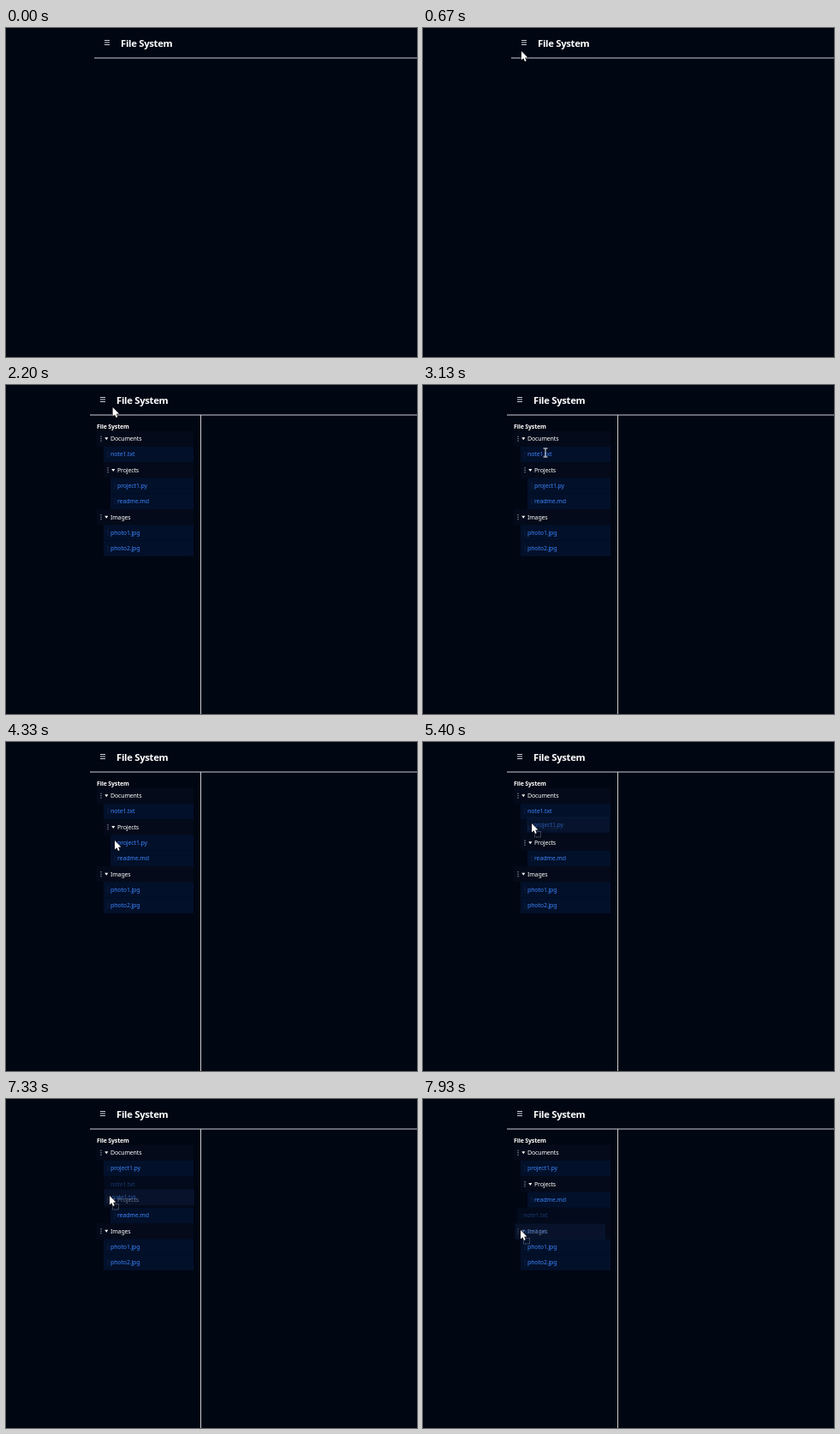
Animation, 480 px wide and 384 px high, one loop 8 s. Source, as an HTML page with a canvas:

```html
<!DOCTYPE html>
<html lang="en">
<head>
<meta charset="utf-8">
<title>File System</title>
<style>
html, body { margin: 0; width: 100%; height: 100%; overflow: hidden; background: #010613; }
canvas { display: block; width: 480px; height: 384px; }
</style>
</head>
<body>
<canvas id="stage"></canvas>
<script>
const LOOP = 8000;
const OPEN_AT = 1870;
const COLORS = {
  page: '#010613', line: '#c9ccd3', text: '#ffffff',
  folder: '#040a19', file: '#03102a', link: '#3b82f6', ghost: '#0b1a38'
};
const canvas = document.getElementById('stage');
const scale = window.devicePixelRatio || 1;
canvas.width = 480 * scale;
canvas.height = 384 * scale;
const ctx = canvas.getContext('2d');

const folder = (name, level) => ({ name, level, isFolder: true });
const file = (name, level, placeholder = false) => ({ name, level, placeholder });
const images = [folder('Images', 0), file('photo1.jpg', 1), file('photo2.jpg', 1)];
const tree = (...rows) => [folder('Documents', 0), ...rows, ...images];

const projects = folder('Projects', 1);
const readme = file('readme.md', 2);
const py = (level, held) => file('project1.py', level, held);
const note = (level, held) => file('note1.txt', level, held);

// Each tree holds from its start time until the next one.
const trees = [
  [0, tree(note(1), projects, py(2), readme)],
  [5270, tree(note(1), projects, py(2, true), readme)],
  [5400, tree(note(1), py(1, true), projects, readme)],
  [5600, tree(py(1, true), note(1), projects, readme)],
  [5800, tree(py(1), note(1), projects, readme)],
  [7330, tree(py(1), note(1, true), projects, readme)],
  [7600, tree(py(1), projects, note(2, true), readme)],
  [7800, tree(py(1), projects, readme, note(0.38, true))]
];

const drags = [
  { from: 5270, to: 5800, name: 'project1.py', width: 97 },
  { from: 7330, to: LOOP, name: 'note1.txt', width: 105 }
];

// Pointer path: time, x, y, shape from that time on.
const path = [
  [70, 9, 90, 'arrow'], [600, 105, 32, 'arrow'], [800, 133, 18, 'arrow'], [1130, 133, 18, 'arrow'],
  [1200, 122, 16, 'hand'], [2100, 122, 16, 'arrow'], [2600, 135, 66, 'arrow'],
  [2730, 135, 66, 'arrow'], [2860, 142, 82, 'beam'], [2930, 142, 79, 'beam'],
  [3130, 143, 79, 'beam'], [3470, 143, 79, 'beam'], [3700, 138, 92, 'arrow'],
  [4130, 132, 122, 'arrow'], [4270, 132, 122, 'arrow'], [4330, 127, 115, 'arrow'],
  [4730, 128, 115, 'move'], [5270, 127, 112, 'arrow'], [5400, 127, 95, 'arrow'],
  [5600, 126, 89, 'arrow'], [5800, 127, 88, 'arrow'], [6130, 127, 88, 'arrow'],
  [6200, 143, 92, 'beam'], [6530, 143, 92, 'beam'], [6600, 119, 96, 'move'],
  [7270, 119, 96, 'move'], [7330, 121, 113, 'arrow'], [7930, 114, 153, 'arrow'], [LOOP, 114, 155, 'arrow']
];

function pointerAt(t) {
  const next = path.findIndex(key => key[0] > t);
  if (next < 1) return null;
  const [t0, x0, y0, shape] = path[next - 1];
  const [t1, x1, y1] = path[next];
  const p = (t - t0) / (t1 - t0);
  return { x: x0 + (x1 - x0) * p, y: y0 + (y1 - y0) * p, shape };
}

function rect(color, x, y, w, h) {
  ctx.fillStyle = color;
  ctx.fillRect(x, y, w, h);
}

function label(text, x, y, color, size = 7, weight = 400) {
  ctx.font = `${weight} ${size}px "Noto Sans", "Open Sans", sans-serif`;
  ctx.letterSpacing = size > 10 ? '-0.3px' : '-0.15px';
  ctx.fillStyle = color;
  ctx.fillText(text, x, y);
}

function polygon(points, fill, stroke) {
  ctx.beginPath();
  for (const [x, y] of points) ctx.lineTo(x, y);
  ctx.closePath();
  if (stroke) {
    ctx.strokeStyle = stroke;
    ctx.lineWidth = 1;
    ctx.stroke();
  }
  ctx.fillStyle = fill;
  ctx.fill();
}

function grip(x, y, color) {
  for (const dy of [-3, -0.5, 2]) rect(color, x - 0.5, y + dy, 1, 1);
}

function drawHeader(shift) {
  const x = 103 - shift;
  rect(COLORS.line, x, 34.5, 480 - x, 1);
  for (const y of [14, 16.5, 19]) rect('#e4e6ea', x + 12, y, 6, 0.9);
  label('File System', x + 31, 22.2, COLORS.text, 11.3, 700);
}

function drawRow(row, index) {
  const y = 62.7 + index * 18.3;
  const left = 106 + row.level * 8;
  ctx.globalAlpha = row.placeholder ? 0.4 : 1;
  rect(row.isFolder ? COLORS.folder : COLORS.file, left, y - 9.2, 219 - left, 18.3);
  if (row.isFolder) {
    grip(left + 5, y, '#d5d8de');
    polygon([[left + 9.3, y - 1.4], [left + 13.3, y - 1.4], [left + 11.3, y + 1.6]], COLORS.text);
    label(row.name, left + 16, y + 2.3, COLORS.text, 7, 500);
  } else {
    grip(left + 5, y, '#16356c');
    label(row.name, left + 8, y + 2.3, COLORS.link);
  }
  ctx.globalAlpha = 1;
}

function drawSidebar(t) {
  const p = Math.min(1, (t - OPEN_AT + 30) / 360);
  const width = 130 * (1 - (1 - p) ** 3);
  ctx.save();
  ctx.beginPath();
  ctx.rect(98, 36, width, 348);
  ctx.clip();
  label('File System', 106, 50.6, COLORS.text, 7, 600);
  trees.filter(([start]) => start <= t).pop()[1].forEach(drawRow);
  ctx.restore();
  rect(COLORS.line, 97 + width, 35, 1, 349);
}

function drawGhost({ name, width }, { x, y }) {
  ctx.globalAlpha = 0.6;
  rect(COLORS.ghost, x - 6, y - 7.5, width, 18.3);
  label(name, x + 2, y + 4, COLORS.link);
  ctx.globalAlpha = 1;
  ctx.strokeStyle = '#8d96a5';
  ctx.lineWidth = 0.8;
  ctx.setLineDash([1, 1]);
  ctx.strokeRect(x + 3.5, y + 9.5, 7, 6.5);
  ctx.setLineDash([]);
}

const shapes = {
  arrow() {
    polygon([[0, 0], [0, 10.5], [2.4, 8.3], [4, 12], [5.7, 11.2], [4.2, 7.7], [7.4, 7.5]], '#fff', '#000');
  },
  hand() {
    polygon([[-1, 0], [0.8, 0], [1, 4], [3, 4], [5, 4.8], [7, 6], [7, 9], [5.7, 12],
      [0, 12], [-3.4, 7.6], [-2.8, 6.6], [-1, 8]], '#fff', '#000');
    for (const x of [1.2, 3.2, 5.1]) rect('#555', x, 5, 0.5, 2.3);
  },
  beam() {
    rect('#e6e8ec', -0.5, -5, 1, 10);
    for (const y of [-5.5, 4.5]) rect('#e6e8ec', -2.5, y, 5, 1);
  },
  move() {
    rect('#fff', -6, -0.5, 12, 1);
    rect('#fff', -0.5, -6, 1, 12);
    for (let i = 0; i < 4; i++) {
      polygon([[0, -7.5], [2.5, -4.5], [-2.5, -4.5]], '#fff');
      ctx.rotate(Math.PI / 2);
    }
  }
};

function draw() {
  const t = performance.now() % LOOP;
  ctx.setTransform(scale, 0, 0, scale, 0, 0);
  rect(COLORS.page, 0, 0, 480, 384);
  const open = t >= OPEN_AT;
  drawHeader(open ? 5 : 0);
  if (open) drawSidebar(t);
  const pointer = pointerAt(t);
  if (pointer) {
    const drag = drags.find(d => t >= d.from && t < d.to);
    if (drag) drawGhost(drag, pointer);
    ctx.translate(pointer.x, pointer.y);
    shapes[pointer.shape]();
  }
  requestAnimationFrame(draw);
}
draw();
</script>
</body>
</html>
```
